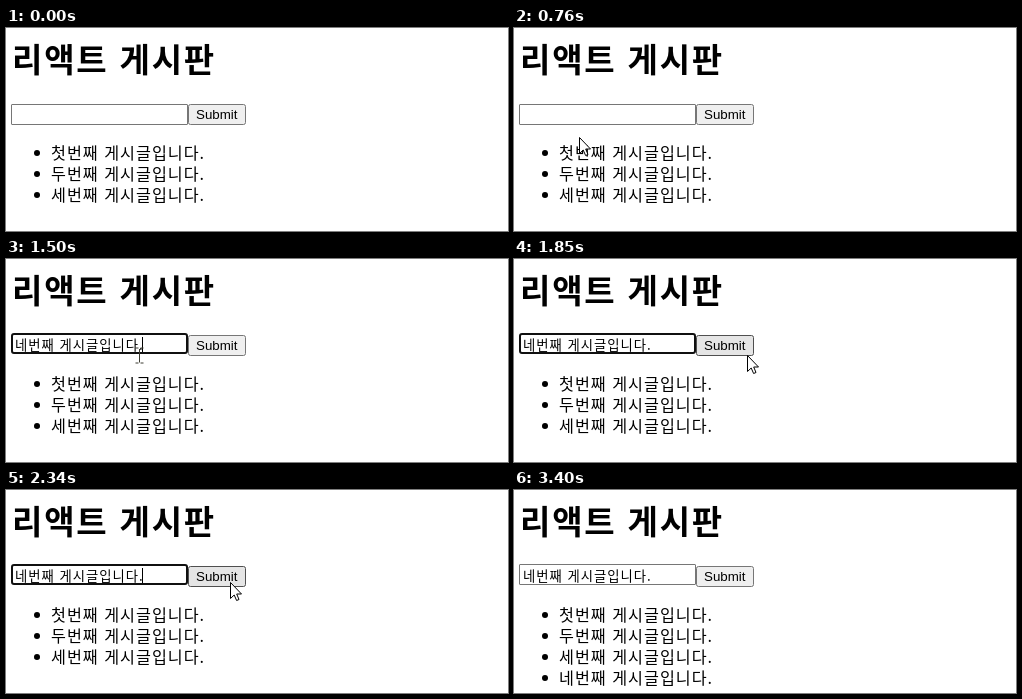
Animation of 502x203 px, one loop 4.33 s. Source, as an HTML page:

```html
<!DOCTYPE html>
<html lang="ko">
<head>
<meta charset="utf-8">
<title>게시판</title>
<style>
  html, body { margin: 0; width: 100%; height: 100%; overflow: hidden; background: #fff; }
  svg { display: block; width: 502px; height: 203px; }
  text { font-family: "Noto Sans CJK KR", "Noto Sans CJK", sans-serif; font-weight: 350; letter-spacing: 1px; white-space: pre; }
  .title { font-size: 33px; font-weight: 700; letter-spacing: 1.8px; }
  .item { font-size: 16.2px; }
  .value { font-size: 13.33px; }
  .label { font-family: "Liberation Sans", Arial, sans-serif; font-size: 13.33px; font-weight: 400; letter-spacing: 0; }
</style>
</head>
<body>
<svg viewBox="0 0 502 203">
  <text class="title" x="6" y="43.5">리액트 게시판</text>

  <g id="field">
    <rect id="border" x="5.5" y="76.5" width="176" height="20" rx="0.5" fill="#fff" stroke="#767676"/>
    <rect id="ring" x="6" y="77" width="175" height="19" rx="2" fill="#fff" stroke="#101010" stroke-width="2"/>
    <text id="value" class="value" x="9" y="92.5">네번째 게시글입니다.</text>
    <path id="caret" d="M0 80V95" stroke="#000"/>
  </g>

  <rect id="button" x="182.5" y="76.5" width="57" height="20" rx="2"/>
  <text class="label" x="190" y="91">Submit</text>

  <g id="list"></g>

  <g id="pointer">
    <circle id="glow" cx="-1" r="12" fill="#ffee00" opacity=".6"/>
    <path id="arrow" d="M.5 .5V16.5L4.2 13L6.6 18.5L9 17.5L6.7 12H11.5Z" fill="#fff" stroke="#000"/>
    <path id="beam" d="M-3.5 -7H-.5M1.5 -7H4.5M.5 -6V7.5M-3.5 8H-.5M1.5 8H4.5" fill="none" stroke="#3a3a30"/>
  </g>
</svg>
<script>
const LOOP = 4330, STEP = 70;
const $ = id => document.getElementById(id);

// Each move glides from the last place to x, y, then rests there.
const origin = { x: 0, y: 169 };
const moves = [
  { from: 410, to: 760, x: 65, y: 109 },
  { from: 760, to: 970, x: 73, y: 96 },
  { from: 1430, to: 1780, x: 240, y: 97 },
  { from: 1780, to: 1850, x: 233, y: 96 },
  { from: 1850, to: 2340, x: 224, y: 92 },
  { from: 3260, to: 3330, x: 316, y: 125 }
];

const items = ["첫번째", "두번째", "세번째", "네번째"].map((word, i) => {
  const row = document.createElementNS("http://www.w3.org/2000/svg", "g");
  row.setAttribute("transform", `translate(0 ${i * 21})`);
  row.innerHTML = `<circle cx="31" cy="125" r="3"/>
    <text class="item" x="45" y="130.5">${word} 게시글입니다.</text>`;
  $("list").append(row);
  return row;
});

const show = (el, on) => el.setAttribute("visibility", on ? "visible" : "hidden");
const place = (el, x, y) => el.setAttribute("transform", `translate(${x} ${y})`);
const within = (t, from, to) => t >= from && t < to;
const easeOut = p => 1 - (1 - p) ** 2;

function pointerAt(t) {
  let { x, y } = origin;
  for (const m of moves) {
    if (t < m.from) break;
    const stepped = Math.floor((t - m.from) / STEP) * STEP;
    const p = easeOut(Math.min(1, stepped / (m.to - m.from)));
    x += (m.x - x) * p;
    y += (m.y - y) * p;
  }
  return [Math.round(x), Math.round(y)];
}

function draw(t) {
  const [x, y] = pointerAt(t);
  const seen = within(t, 410, 3400);
  const inRow = seen && within(y, 76, 97);
  const overField = inRow && within(x, 5, 182);
  const hover = inRow && within(x, 182, 240);
  const focused = within(t, 1100, 2540);
  const filled = t >= 1500;

  // The field rises slightly once it holds Korean text.
  place($("field"), 0, filled ? -2 : 0);
  show($("border"), !focused);
  show($("ring"), focused);
  show($("value"), filled);
  show($("caret"), within(t, 1100, 1850) || within(t, 2340, 2540));
  place($("caret"), filled ? 136.5 : 9.5, 0);

  $("button").setAttribute("fill", hover ? "#e5e5e5" : "#efefef");
  $("button").setAttribute("stroke", hover ? "#4f4f4f" : "#767676");
  show(items[3], t >= 2670);

  place($("pointer"), x, y);
  show($("arrow"), seen && !overField);
  show($("beam"), overField);
  show($("glow"), within(t, 1040, 1230) || within(t, 2540, 2670));
}

const start = performance.now();
function tick() {
  draw((performance.now() - start) % LOOP);
  requestAnimationFrame(tick);
}
tick();
</script>
</body>
</html>
```
